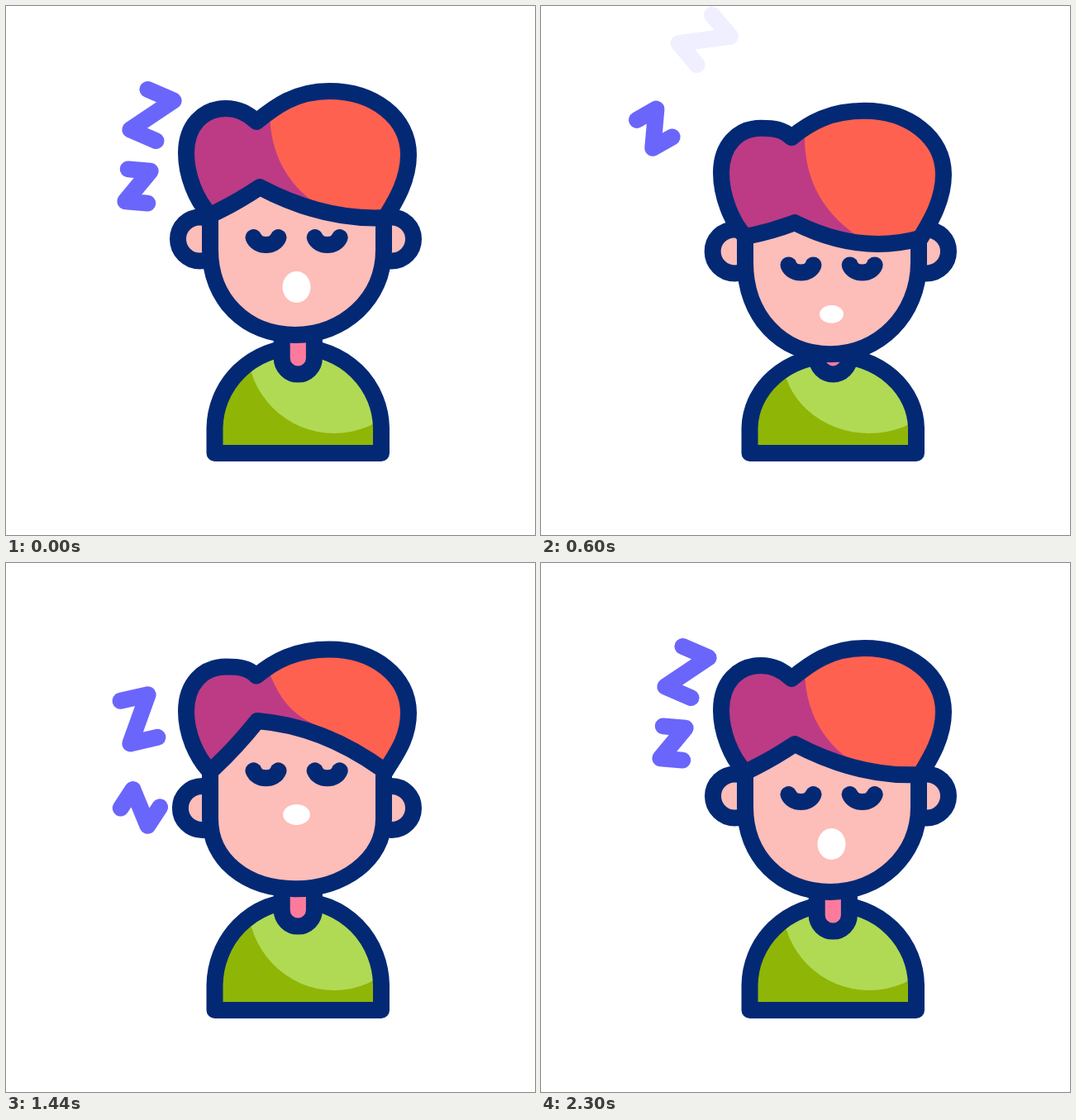
An HTML page that plays this animation: 640 px wide and 640 px high, repeating every 2400 ms.

```html
<!DOCTYPE html>
<html lang="en">
<head>
<meta charset="utf-8">
<title>Sleeper</title>
<style>
  html, body { margin: 0; width: 100%; height: 100%; overflow: hidden; background: #fff; }
  svg { display: block; width: 100%; height: 100%; }
  .line { stroke: #032975; stroke-width: 20; stroke-linecap: round; stroke-linejoin: round; }
  .none { fill: none; }
  .skin { fill: #fdbdb8; }
  .z { fill: none; stroke: #6a66fb; stroke-width: 20; stroke-linecap: round; stroke-linejoin: round; }
</style>
</head>
<body>
<svg viewBox="0 0 640 640">
  <defs>
    <clipPath id="bodyClip"><path id="bodyShape"/></clipPath>
    <clipPath id="hairClip"><path id="hairShape"/></clipPath>
  </defs>

  <path id="zBig" class="z" d="M-17-26.5H17L-17 26.5H17"/>
  <path id="zSmall" class="z" d="M-13.5-19.5H13.5L-13.5 19.5H13.5"/>

  <path id="body" fill="#8fb507"/>
  <ellipse id="light" cx="397" rx="105" fill="#b0da54" clip-path="url(#bodyClip)"/>
  <path id="bodyLine" class="line none"/>
  <path id="neck" class="line" fill="#fc7b9d" d="M333.7 402V426a19.6 19.6 0 0 0 39.2 0V402"/>

  <circle id="earL" class="line skin" r="26.5"/>
  <circle id="earR" class="line skin" r="26.5" cx="466.5"/>
  <path id="face" class="skin"/>
  <path id="faceLine" class="line none"/>
  <g id="eyes">
    <path class="line none" d="M299.5 280C304 292 325 292 329.5 280"/>
    <path class="line none" d="M373.7 280C378.2 292 399.2 292 403.7 280"/>
  </g>
  <ellipse id="mouth" cx="351.5" fill="#fff"/>

  <path id="hair" fill="#bc3b84"/>
  <path id="red" fill="#ff6150" clip-path="url(#hairClip)"/>
  <path id="hairLine" class="line none"/>
</svg>
<script>
const LOOP = 2400, END = 2300;
const $ = id => document.getElementById(id);
const set = (id, attrs) => {
  for (const k in attrs) $(id).setAttribute(k, attrs[k]);
};

// Smooth periodic curve through the keys, without overshoot.
function track(times, values) {
  const T = [...times, END], V = [...values, values[0]], n = values.length;
  const sec = values.map((v, i) => (V[i + 1] - v) / (T[i + 1] - T[i]));
  const slope = V.map((_, i) => {
    const a = sec[(i + n - 1) % n], b = sec[i % n];
    return a * b > 0 ? 2 * a * b / (a + b) : 0;
  });
  return t => {
    let i = 0;
    while (i < n - 1 && t >= T[i + 1]) i++;
    const h = T[i + 1] - T[i], u = (t - T[i]) / h, w = 1 - u;
    return V[i] * w * w * (1 + 2 * u) + V[i + 1] * u * u * (3 - 2 * u)
      + h * u * w * (slope[i] * w - slope[i + 1] * u);
  };
}

const tracks = (times, rows) =>
  Object.entries(rows).map(([name, values]) => [name, track(times, values)]);
const sample = (list, t) =>
  Object.fromEntries(list.map(([name, f]) => [name, f(t)]));

const person = tracks([0, 380, 820, 1200, 1500, 1880], {
  hair:    [0, 17, 27.3, 10.7, 0.8, 0],
  notch:   [0, 13.5, 22, 5, -4, -1.5],
  left:    [0, 19, 29.3, 9, -1.3, 0],
  right:   [0, 18, 28.3, 6, -4.5, -3],
  tipX:    [307, 307, 307, 305, 304, 305],
  tipY:    [219, 251, 267.5, 218.5, 189, 202],
  fringe:  [260, 293.5, 305, 233, 195, 216],
  squash:  [1, 1.07, 1.1, 0.78, 0.56, 0.74],
  chin:    [0, 17, 26.3, 7, -4.5, -2],
  ear:     [282, 292, 299.5, 298, 296, 289],
  earX:    [234.5, 234, 234.5, 236, 237.5, 235.5],
  eyes:    [0, 25, 37.5, -4, -30.5, -17],
  mouthY:  [340, 365, 376.5, 331, 302.5, 319.5],
  mouthRx: [17, 15.5, 14, 15.5, 16.5, 17],
  mouthRy: [19, 13.5, 9.3, 11.5, 12.8, 16],
  body:    [99, 93.5, 86.5, 97.5, 103.5, 102],
  neck:    [0, 0, -0.7, -4, -6.2, -4]
});

const zBig = tracks([0, 380, 540, 620, 1080, 1200, 1440, 1640, 1740], {
  x: [176.5, 190, 196, 198, 198, 182, 161, 173.5, 176.5],
  y: [132, 74, 50, 40, 244, 227, 189, 139.4, 132],
  a: [23.4, 40, 47, 50, -52, -38.5, -13, 17.4, 23.4]
});
const zSmall = tracks([0, 380, 540, 780, 1320, 1440, 1680, 1880, 1980], {
  x: [159.5, 162, 149, 101, 177, 162.5, 150, 157, 159.5],
  y: [218, 181, 160, 118, 309, 296, 264, 224, 218],
  a: [5, -12, -25, -42, -70, -57, -31, -1, 5]
});

const ramp = (t, a, b) => Math.min(1, Math.max(0, (t - a) / (b - a)));

function drawZ(id, list, t, [out0, out1, in0, in1]) {
  const z = sample(list, t);
  set(id, {
    transform: `translate(${z.x} ${z.y}) rotate(${z.a})`,
    opacity: 1 - ramp(t, out0, out1) + ramp(t, in0, in1)
  });
}

function hairPath(p) {
  const y = v => v + p.hair, l = 253 + p.left, r = 256 + p.right, n = 140 + p.notch;
  return `M247 ${l}C230 ${l - 18} 218 ${y(205)} 218 ${y(178)}`
    + `C218 ${y(145)} 238 ${y(124)} 266 ${y(124)}C282 ${y(124)} 293 ${n - 10} 303 ${n}`
    + `C325 ${n - 18} 350 ${y(103)} 391 ${y(103)}C445 ${y(103)} 487 ${y(135)} 487 ${y(180)}`
    + `C487 ${y(210)} 472 ${r - 21} 459 ${r}`
    + `Q385 ${p.fringe} ${p.tipX} ${p.tipY}`
    + `Q277 ${(l + p.tipY) / 2 + 3} 247 ${l}Z`;
}

function facePath(p) {
  const chin = 398 + p.chin, side = p.ear + 13, bend = side + (chin - side) * 0.58;
  return `M247 ${255 + p.left}V${side}C247 ${bend} 290 ${chin} 350 ${chin}`
    + `C408 ${chin} 457 ${bend} 457 ${side}V${257 + p.right}`;
}

function draw(t) {
  const p = sample(person, t);

  drawZ('zBig', zBig, t, [440, 620, 1080, 1215]);
  drawZ('zSmall', zSmall, t, [600, 780, 1320, 1430]);

  const body = `M252.5 541V512A100.75 ${p.body} 0 0 1 454 512V541Z`;
  for (const id of ['body', 'bodyShape', 'bodyLine']) set(id, { d: body });
  const ry = p.body * 1.06;
  set('light', { cy: 517 - ry, ry });
  set('neck', { transform: `translate(0 ${p.neck})` });

  set('earL', { cx: p.earX, cy: p.ear });
  set('earR', { cy: p.ear });
  const face = facePath(p);
  set('face', { d: `${face}V${p.tipY}H247Z` });
  set('faceLine', { d: face });
  set('eyes', { transform: `translate(0 ${p.eyes})` });
  set('mouth', { cy: p.mouthY, rx: p.mouthRx, ry: p.mouthRy });

  const hair = hairPath(p);
  for (const id of ['hair', 'hairShape', 'hairLine']) set(id, { d: hair });
  const s = v => 135 + p.hair + (v - 135) * p.squash;
  const lean = 320 + 30 * (1 - p.squash);
  set('red', {
    d: `M319 ${s(130)}C${lean} ${s(190)} 350 ${s(228)} 396 ${s(252)}L420 400H520V80H319Z`
  });
}

const start = performance.now();
function tick() {
  draw(Math.min((performance.now() - start) % LOOP, END));
  requestAnimationFrame(tick);
}
draw(0);
requestAnimationFrame(tick);
</script>
</body>
</html>
```
